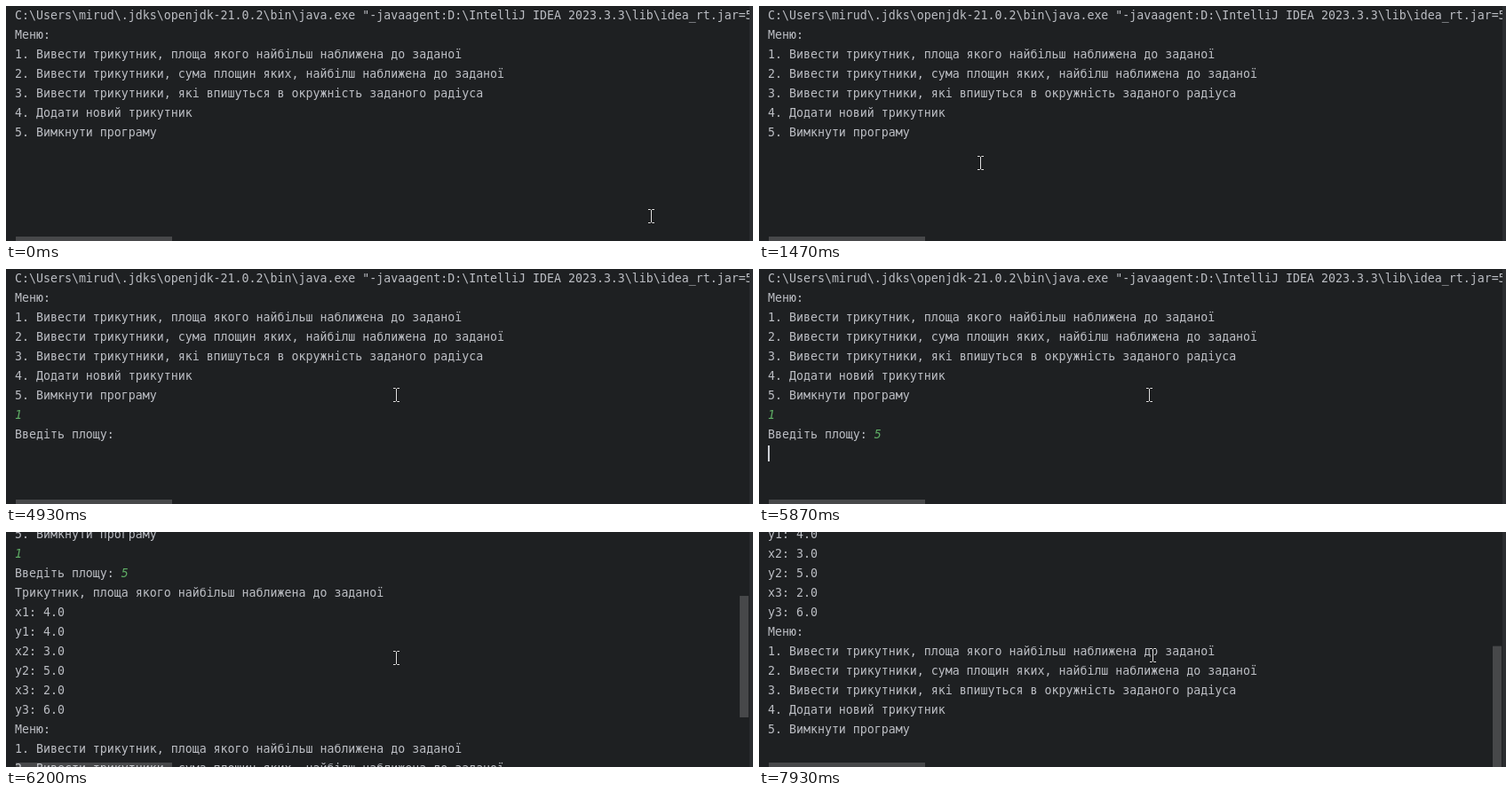
Recreate the animation shown at these times as an HTML page. Size 841 by 265 pixels, loop 8 s.

```html
<!DOCTYPE html>
<html lang="uk">
<head>
<meta charset="utf-8">
<title>Console</title>
<style>
  html, body { margin: 0; width: 100%; height: 100%; overflow: hidden; background: #1e2022; }
  #stage { position: relative; width: 841px; height: 265px; overflow: hidden; }
  #view { position: absolute; left: 0; top: 0; width: 837px; height: 265px; overflow: hidden; }
  #page { position: absolute; left: 10px; top: 0; }
  #page div {
    height: 22px; white-space: pre; color: #bcbec4;
    font: 13.288px/21px "DejaVu Sans Mono", "Noto Sans Mono", monospace;
  }
  #page i { color: #5fad65; }
  #caret { position: absolute; left: 0; top: 1px; width: 2px; height: 18px; background: #ced0d6; }
  .bar { position: absolute; background: rgba(255, 255, 255, .18); }
  #hbar { left: 11px; top: 260px; width: 176px; height: 5px; }
  #vbar { left: 826px; top: 0; width: 10px; height: 137px; }
  #edge { position: absolute; left: 837px; top: 0; width: 4px; height: 265px; background: #2b2d30; }
  #mouse { position: absolute; left: 0; top: 0; width: 11px; height: 18px; }
</style>
</head>
<body>
<div id="stage">
  <div id="view">
    <div id="page"><span id="caret"></span></div>
    <div id="hbar" class="bar"></div>
    <div id="vbar" class="bar"></div>
  </div>
  <div id="edge"></div>
  <svg id="mouse" viewBox="0 0 11 18" fill="none">
    <defs><path id="beam" d="M2 1.5H4.5L5.5 2.5L6.5 1.5H9M5.5 2V16M2 16.5H4.5L5.5 15.5L6.5 16.5H9"/></defs>
    <use href="#beam" stroke="#17181a" stroke-width="3"/>
    <use href="#beam" stroke="#e4e4e4"/>
  </svg>
</div>
<script>
const LOOP = 8000, LINE = 22, CHAR = 8, VIEW = 265, FRAME = 67;
const $ = id => document.getElementById(id);
const page = $('page');

const menu = `Меню:
1. Вивести трикутник, площа якого найбільш наближена до заданої
2. Вивести трикутники, сума площин яких, найбілш наближена до заданої
3. Вивести трикутники, які впишуться в окружність заданого радіуса
4. Додати новий трикутник
5. Вимкнути програму
`;
const command = 'C:\\Users\\mirud\\.jdks\\openjdk-21.0.2\\bin\\java.exe ' +
  '"-javaagent:D:\\IntelliJ IDEA 2023.3.3\\lib\\idea_rt.jar=5\n';
const result = `Трикутник, площа якого найбільш наближена до заданої
x1: 4.0
y1: 4.0
x2: 3.0
y2: 5.0
x3: 2.0
y3: 6.0
`;

// Console log: time, text, typed by the user
const log = [
  [0, command + menu],
  [1930, ''],
  [3000, '1', true],
  [3930, '\n'],
  [4130, 'Введіть площу: '],
  [5530, '5', true],
  [5870, '\n'],
  [6130, result + menu]
];

const shift = (x, y) => ({ transform: `translate(${x}px, ${y}px)` });

// Plays [time, style] steps, each held until the next one.
function play(el, steps) {
  const frames = steps.map(([t, style]) => ({ offset: t / LOOP, easing: 'steps(1, end)', ...style }));
  frames.push({ ...frames[frames.length - 1], offset: 1 });
  el.animate(frames, { duration: LOOP, iterations: Infinity });
}

let row, rows = 0, col = 0;
function newRow() {
  row = page.appendChild(document.createElement('div'));
  rows++;
  col = 0;
}

function write(time, text, typed) {
  text.split('\n').forEach((part, i) => {
    if (i) newRow();
    const el = row.appendChild(document.createElement(typed ? 'i' : 'span'));
    el.textContent = part;
    col += part.length;
    if (time) play(el, [[0, { opacity: 0 }], [time, { opacity: 1 }]]);
  });
}

// The caret follows the text and blinks once it has rested.
const caret = [];
newRow();
log.forEach(([time, text, typed], i) => {
  write(time, text, typed);
  const pos = shift(col && col * CHAR - 1, (rows - 1) * LINE);
  const next = i + 1 < log.length ? log[i + 1][0] : LOOP;
  caret.push([time, { opacity: i ? 1 : 0, ...pos }]);
  for (let off = 930; i && off < next; off += 1000) {
    if (off < time + 500) continue;
    caret.push([off, { opacity: 0, ...pos }]);
    if (off + 540 < next) caret.push([off + 540, { opacity: 1, ...pos }]);
  }
});
play($('caret'), caret);

// Scroll to the end of the log in three frames.
const content = rows * LINE + 9, end = content - VIEW;
const scroll = [0, 1, 2, 3].map(k => [k && 6130 + (k - 1) * 70, Math.round(end * (k / 3) ** 1.43)]);
play(page, scroll.map(([t, y]) => [t, shift(0, -y)]));
play($('vbar'), scroll.map(([t, y]) => [t, { opacity: y ? 1 : 0, ...shift(0, y * VIEW / content) }]));

// Mouse moves: first step, last step, end x, end y
const moves = [
  [70, 270, 546, 216],
  [530, 1066, 262, 170],
  [1133, 1200, 249, 178],
  [1470, 1470, 249, 177],
  [1670, 1670, 250, 177],
  [2130, 2600, 439, 142],
  [7930, 7930, 443, 139]
];
const place = (x, y) => shift(Math.round(x) - 5, Math.round(y) - 9);
const ease = p => p * p * (3 - 2 * p);
let x = 726, y = 237;
const path = [[0, place(x, y)]];
for (const [from, to, endX, endY] of moves) {
  const count = Math.round((to - from) / FRAME) + 1;
  for (let k = 1; k <= count; k++) {
    const p = ease(k / count);
    path.push([from + (k - 1) * FRAME, place(x + (endX - x) * p, y + (endY - y) * p)]);
  }
  x = endX;
  y = endY;
}
play($('mouse'), path);
</script>
</body>
</html>
```
